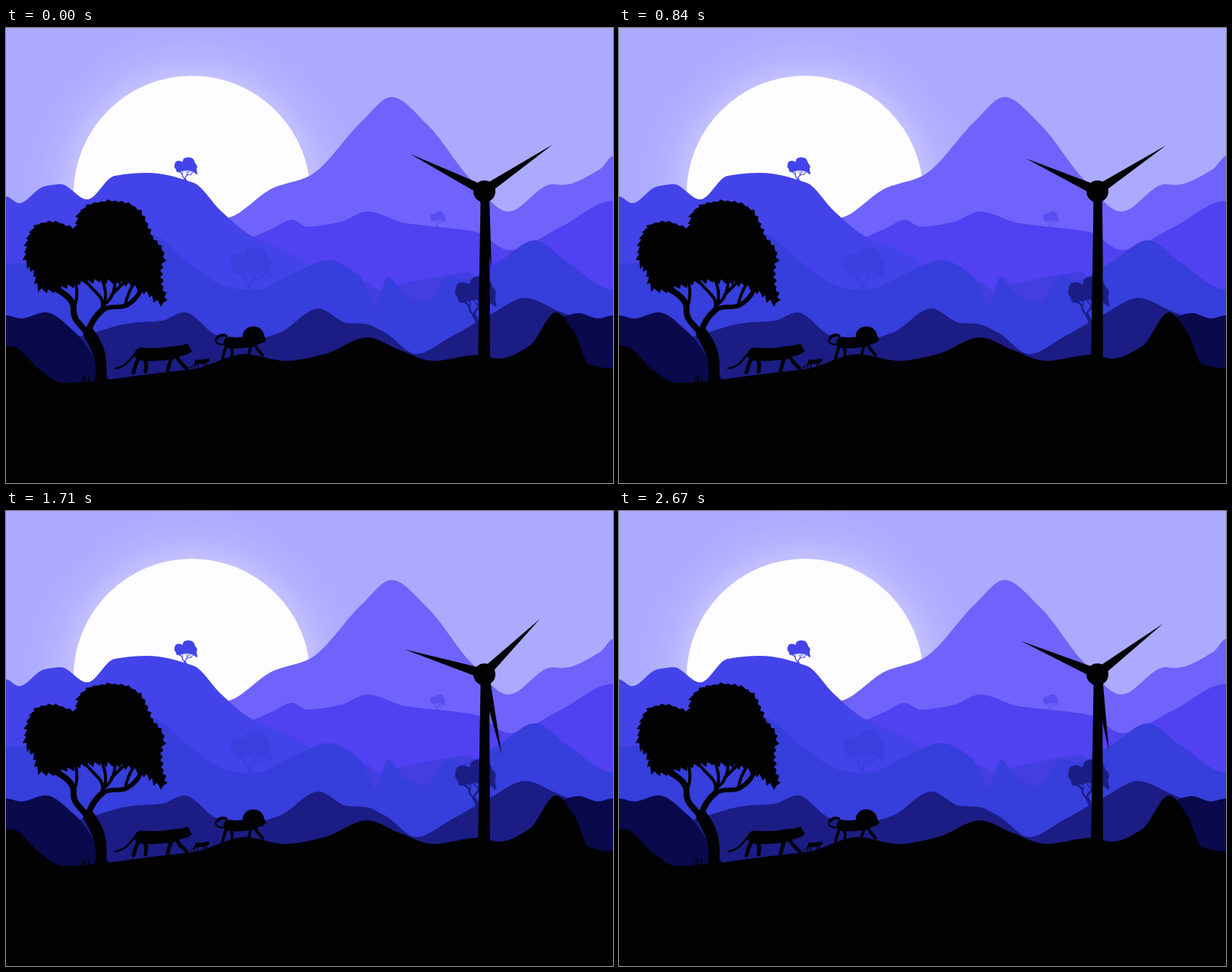
An HTML page for the animation above (2700 ms loop, 800 px wide and 600 px high).

```html
<!DOCTYPE html>
<html lang="en">
<head>
<meta charset="utf-8">
<title>Wind turbine at dusk</title>
<style>
  html, body { margin: 0; width: 100%; height: 100%; overflow: hidden; background: #acaaff; }
  svg { display: block; width: 100vw; height: 100vh; }
</style>
</head>
<body>
<svg id="stage" viewBox="0 0 800 600">
  <defs>
    <radialGradient id="halo" gradientUnits="userSpaceOnUse" cx="245" cy="219" r="226">
      <stop offset=".69" stop-color="#c3c0ff"/>
      <stop offset=".78" stop-color="#b7b5ff"/>
      <stop offset=".9" stop-color="#afadff"/>
      <stop offset="1" stop-color="#acaaff"/>
    </radialGradient>
    <g id="tree">
      <path id="crown"/>
      <path d="M117 468C122 440 113 424 101 404L114 396C130 418 135 432 132 468Z"/>
      <g fill="none" stroke="currentColor" stroke-linecap="round">
        <path stroke-width="8" d="M108 404C98 388 88 388 89 368Q88 356 66 344M108 402Q113 383 128 371"/>
        <path stroke-width="6" d="M126 372C140 364 150 371 160 365Q172 358 178 345"/>
        <path stroke-width="4" d="M89 370Q96 356 92 335M126 372Q130 360 122 352T106 335M127 367Q136 355 126 330M129 365Q144 355 144 330M139 352L156 335M157 366Q160 350 168 338"/>
      </g>
    </g>
    <g id="cat" stroke-linecap="round" stroke-linejoin="round">
      <path fill="none" stroke="currentColor" stroke-width="17" d="M178 430Q200 432 221 428"/>
      <path fill="none" stroke="currentColor" stroke-width="5" d="M176 432L171 444L168 454M182 434L185 444L184 453M224 432L229 440L238 449M218 435L215 444L213 452"/>
      <path d="M220 420L234 418L239 416L245 426L240 430L226 434Z"/>
    </g>
  </defs>
  <rect width="800" height="600" fill="#acaaff"/>
  <circle cx="245" cy="219" r="226" fill="url(#halo)"/>
  <circle cx="245" cy="219" r="156" fill="#fdfdff"/>
</svg>
<script>
const stage = document.getElementById('stage');
const pale = '#6f63fb', violet = '#5041f1', blue = '#4343ea', haze = '#423ee0',
  deep = '#363edb', navy = '#1b1d85', night = '#09094c', ink = '#020203';

function add(tag, attrs) {
  const el = document.createElementNS('http://www.w3.org/2000/svg', tag);
  for (const key in attrs) el.setAttribute(key, attrs[key]);
  return stage.appendChild(el);
}

const parse = text => text.split(' ').map(pair => pair.split(',').map(Number));

// Ridge through crests, dips and shoulders; crests and dips are level
function hill(fill, text) {
  const points = parse(text);
  const rise = i => points[i + 1] && points[i]
    ? (points[i + 1][1] - points[i][1]) / (points[i + 1][0] - points[i][0]) : 0;
  const slope = i => rise(i - 1) * rise(i) > 0
    ? 2 * rise(i - 1) * rise(i) / (rise(i - 1) + rise(i)) : 0;
  let d = 'M' + points[0];
  for (let i = 1; i < points.length; i++) {
    const [x0, y0] = points[i - 1], [x1, y1] = points[i], third = (x1 - x0) / 3;
    d += `C${x0 + third} ${y0 + third * slope(i - 1)} ${x1 - third} ${y1 - third * slope(i)} ${x1} ${y1}`;
  }
  add('path', { fill, d: d + 'V600H0Z' });
}

// Leaves hang outwards and down along a rounded outline
function growCrown(text) {
  const points = parse(text), n = points.length, crown = document.getElementById('crown');
  const middle = i => points[i % n].map((v, k) => (v + points[(i + 1) % n][k]) / 2);
  crown.setAttribute('d', 'M' + middle(n - 1) + points.map((p, i) => `Q${p} ${middle(i)}`).join(''));
  const length = crown.getTotalLength(), count = Math.round(length / 9), edge = [];
  for (let i = 0; i < count; i++) {
    const s = i * length / count;
    const p = crown.getPointAtLength(s), q = crown.getPointAtLength(s + 1);
    const dx = q.x - p.x, dy = q.y - p.y, out = 4 + Math.sin(i * 2.4);
    edge.push([p.x, p.y], [p.x + dx * 2 + dy * out, p.y + dy * 2 - dx * out + 2]);
  }
  crown.setAttribute('d', 'M' + edge.join('L') + 'Z');
}

// Places a tree by the top left corner of its crown
const tree = (color, x, y, scale) => add('use', {
  href: '#tree', fill: color, color,
  transform: `translate(${x} ${y}) scale(${scale}) translate(-25 -230)`
});

// Places a cat by its hind paw
const cat = (x, y, sx, sy) => add('use', {
  href: '#cat', fill: ink, color: ink,
  transform: `translate(${x} ${y}) scale(${sx} ${sy}) translate(-166 -456)`
});

const line = (width, d) => add('path', {
  d, fill: 'none', stroke: ink, 'stroke-width': width, 'stroke-linecap': 'round'
});

growCrown('24,312 32,260 68,254 94,270 96,236 142,226 178,238 190,276 210,295 200,325 214,372 182,342 150,332 110,330 76,340 42,348 38,314');

hill(pale, '0,300 294,250 352,211 400,195 470,122 508,91 555,127 613,200 662,242 720,206 732,207 783,186 800,169');
tree('#5a4df2', 559, 242, .109);
hill(violet, '0,320 300,284 350,265 377,253 397,262 440,256 476,242 525,257 620,269 663,293 730,263 800,228');
tree(blue, 222, 171, .163);
hill(blue, '0,222 17,231 50,209 72,206 107,226 143,195 186,191 247,204 283,241 320,272 390,305 480,400');
hill(haze, '0,400 440,360 475,335 495,347 520,338 580,326 610,322 650,400 800,400');
tree('#3b3fdd', 296, 290, .293);
hill(deep, '0,311 80,300 190,272 240,309 290,341 325,346 380,323 425,306 466,327 488,366 503,328 525,352 553,363 585,327 600,333 650,308 697,280 740,309 800,345');
tree(navy, 592, 328, .293);
hill(navy, '0,430 105,405 165,389 205,386 235,375 278,405 315,413 360,402 412,370 450,389 472,390 500,402 541,430 585,408 640,377 684,356 730,374 800,400');
hill(night, '0,379 20,383 52,375 92,402 150,470 660,460 740,379 755,376 780,383 800,379');
hill(ink, '0,419 10,420 45,451 75,468 200,455 250,449 315,430 368,439 420,430 476,408 520,425 563,439 622,431 650,436 690,419 725,375 750,403 768,443 800,449');
tree(ink, 25, 230, 1);
for (let x = 101; x < 110; x += 4) line(1.4, `M${x} 467l${x % 3 - 1} -7`);

// Lioness and cub
line(2.6, 'M144 449Q156 447 163 438T174 427');
cat(166, 456, 1, 1);
line(1.2, 'M242 448Q246 447 250 441');
cat(248, 449, .26, .34);

// Lion with mane and raised tail
line(2, 'M290 417Q277 419 276 411');
line(4, 'M278 409Q283 403 290 406');
cat(284, 437, .75, .86);
add('ellipse', { cx: 326, cy: 406, rx: 14, ry: 12.5, fill: ink });

// Turbine: each blade has its own length and rest angle
add('path', { fill: ink, d: 'M625.5 226H637L638 440H622Z' });
add('circle', { fill: ink, cx: 630.5, cy: 215.5, r: 14.5 });
const rotor = add('g', { fill: ink });
for (const [length, angle] of [[109.5, -34], [103, 84.5], [109, 206.6]]) {
  rotor.append(add('path', { d: `M12 -6L${length} 0L12 6Z`, transform: `rotate(${angle})` }));
}

// Each third of the turn runs at its own steady speed
const LOOP = 2700, STEP = 30, THIRDS = [0, 840, 1780, 2695];
function draw(now) {
  const t = Math.floor(now % LOOP / STEP) * STEP;
  const i = THIRDS.findLastIndex(start => start <= t);
  const turn = 120 * (i + (t - THIRDS[i]) / (THIRDS[i + 1] - THIRDS[i]));
  rotor.setAttribute('transform', `translate(630 214.7) rotate(${turn})`);
  requestAnimationFrame(draw);
}
draw(0);
</script>
</body>
</html>
```
